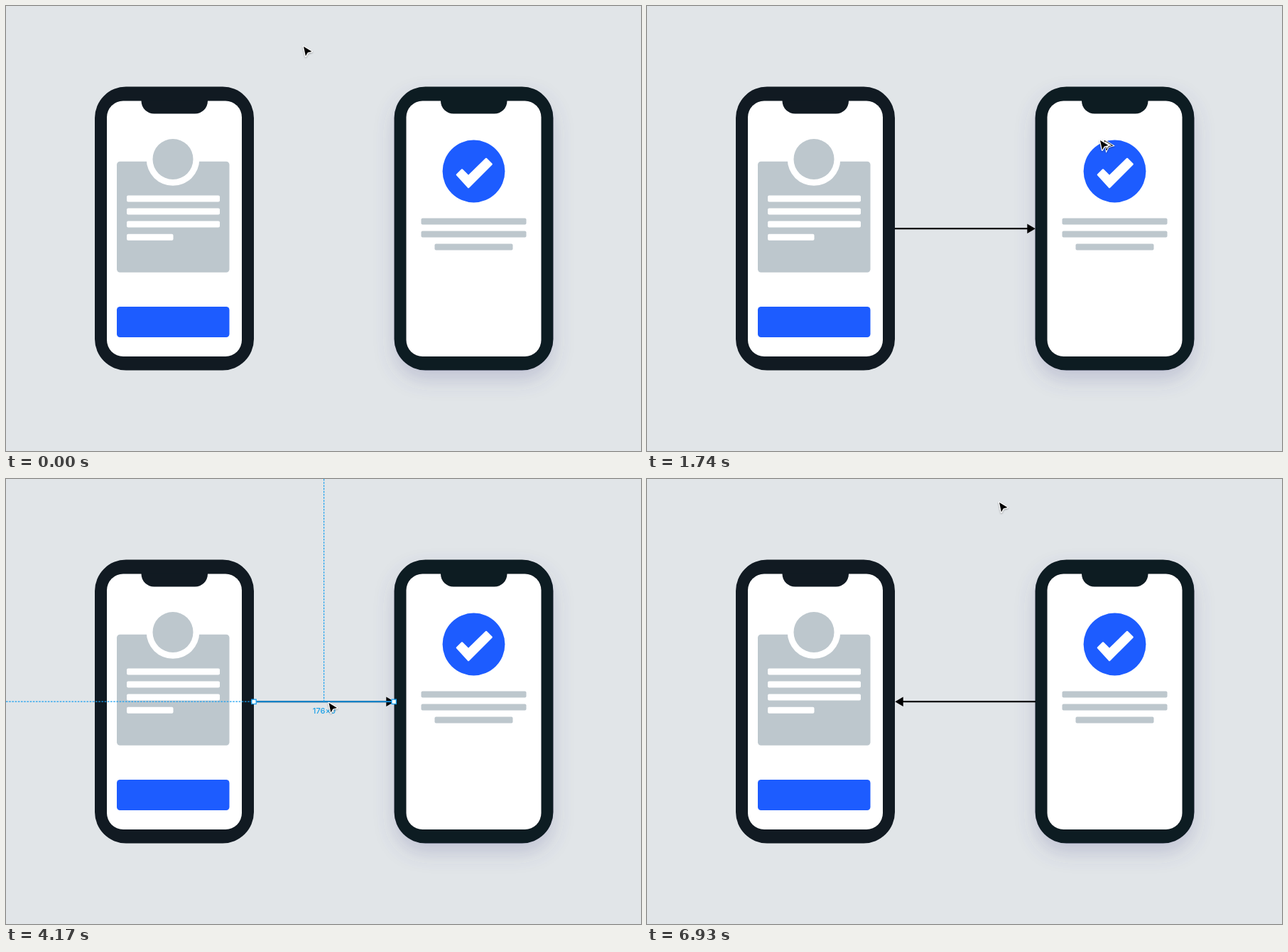
An HTML page that plays this animation: 894x626 px, repeating every 6.96 s.

```html
<!DOCTYPE html>
<html lang="en">
<head>
<meta charset="utf-8">
<title>Connecting two screens</title>
<style>
  html, body { margin: 0; width: 100%; height: 100%; overflow: hidden; background: #e1e5e8; }
  svg { display: block; width: 100vw; height: 100vh; }
  text { font: 500 11px Inter, sans-serif; fill: #18a0e8; text-anchor: middle; letter-spacing: .1px; }
  .outline { fill: none; stroke: #189ff0; stroke-width: 1.3; }
  .hover { fill: none; stroke: #1595f2; stroke-width: 2; }
  .handle { fill: #fff; stroke: #189ff0; stroke-width: 1.3; }
  .guide { fill: none; stroke: #189ff0; stroke-width: 1.2; stroke-dasharray: 2.6 1.6; }
</style>
</head>
<body>
<svg viewBox="0 0 894 626">
  <defs>
    <filter id="phoneShadow" x="-30%" y="-20%" width="160%" height="145%">
      <feDropShadow dx="0" dy="13" stdDeviation="14" flood-color="#50508c" flood-opacity=".22"/>
    </filter>
    <filter id="cursorShadow" x="-50%" y="-50%" width="200%" height="200%">
      <feDropShadow dx="0" dy="1" stdDeviation=".8" flood-color="#000" flood-opacity=".35"/>
    </filter>
    <g id="phone">
      <rect width="224" height="399" rx="44" fill="#111a22"/>
      <rect x="17" y="20" width="190" height="359.5" rx="23" fill="#fff"/>
      <path d="M65.5 19h93.5v1a18 18 0 0 1-18 18h-57.500a18 18 0 0 1-18-18z" fill="#111a22"/>
    </g>
    <path id="pointer" d="M1 1 12.500 8 6.700 9.400 3.900 14.600Z"/>
  </defs>
  <rect width="894" height="626" fill="#e1e5e8"/>

  <use href="#phone" x="125" y="113.5"/>
  <g fill="#bdc7cd">
    <rect x="156" y="218.800" width="158.500" height="156" rx="4.500"/>
    <circle cx="235" cy="215.500" r="37.300" fill="#fff"/>
    <circle cx="235" cy="215.500" r="28.500"/>
  </g>
  <g id="cardLines" fill="#fff"></g>
  <rect x="156" y="423" width="158.500" height="43" rx="4.500" fill="#1d5cff"/>

  <use href="#phone" x="546.5" y="113.5" filter="url(#phoneShadow)"/>
  <circle cx="658.500" cy="232.500" r="43.900" fill="#1d5cff"/>
  <path d="M635 237.500 642 230.500 651 239.500 676 215 683.500 222.500 651 255Z" fill="#fff" stroke="#fff" stroke-width="2.500" stroke-linejoin="round"/>
  <g id="doneLines" fill="#bdc7cd"></g>

  <g id="arrow">
    <path d="M349 313.200H538" stroke="#000" stroke-width="2.300"/>
    <path d="M546.800 313.200 535.300 306.500V319.900Z"/>
  </g>
  <path id="arrowHover" class="hover" d="M349 313.200H546.500" stroke-opacity=".65"/>
  <rect id="leftHover" class="hover" x="124.500" y="113" width="225" height="400.500"/>
  <rect id="rightHover" class="hover" x="546" y="113" width="225" height="400.500"/>

  <g id="leftSelection"></g>
  <g id="bothSelection"></g>
  <g id="arrowSelection"></g>

  <g id="cursor" filter="url(#cursorShadow)">
    <g id="copyPointer" transform="translate(6 .3)">
      <use href="#pointer" stroke="#fff" stroke-width="2.600"/>
      <use href="#pointer" fill="#fff" stroke="#000" stroke-width=".9"/>
    </g>
    <use href="#pointer" stroke="#fff" stroke-width="2.400" stroke-linejoin="round"/>
    <use href="#pointer"/>
  </g>
</svg>
<script>
const LOOP = 6960;
const el = id => document.getElementById(id);
const show = (id, on) => el(id).setAttribute('visibility', on ? 'visible' : 'hidden');
const within = (t, from, to) => t >= from && t < to;

const bar = (x, y, width) => `<rect x="${x}" y="${y}" width="${width}" height="9" rx="2"/>`;
const handle = (x, y) => `<rect class="handle" x="${x - 3.2}" y="${y - 3.2}" width="6.4" height="6.4"/>`;
const box = (x, w) => `<rect class="outline" x="${x}" y="113.300" width="${w}" height="400"/>`;
const corners = (left, right) =>
  [left, right].map(x => handle(x, 113.5) + handle(x, 513)).join('');
const label = (x, y, size) => `<text x="${x}" y="${y}">${size}</text>`;
const guides = (x, top, left) =>
  `<path class="guide" d="M${x} 0V${top}M0 313.200H${left}"/>`;

el('cardLines').innerHTML = [131, 131, 131, 65.5].map((w, i) => bar(170, 266.4 + i * 18.1, w)).join('');
el('doneLines').innerHTML = [148, 148, 110].map((w, i) => bar(658.5 - w / 2, 298.6 + i * 18, w)).join('');

el('leftSelection').innerHTML =
  guides(237, 113, 125) + box(124.8, 224.6) + corners(125, 349) + label(236.7, 529, '200×356');
el('bothSelection').innerHTML =
  box(124.8, 224.6) + box(546.2, 224.6) + box(124.8, 646) + corners(125, 771) + label(448, 529, '576×356');
el('arrowSelection').innerHTML =
  guides(447.6, 313, 349) + '<path class="outline" d="M349 313.200H546.500"/>' +
  handle(349, 313.3) + handle(546.2, 313.3) + label(448, 330, '176×0');

// Cursor moves: start time, end time, destination
const start = [418, 56];
const moves = [
  [30, 360, 262, 172],
  [460, 840, 637, 188],
  [2220, 2470, 452.5, 139],
  [2940, 3520, 453.5, 314],
  [5130, 5460, 453.5, 249.5],
  [5880, 6400, 495, 32]
];
const ease = p => p < .5 ? 4 * p ** 3 : 1 - (2 - 2 * p) ** 3 / 2;

function cursorAt(t) {
  let [x, y] = start;
  for (const [from, to, toX, toY] of moves) {
    if (t <= from) break;
    const p = ease(Math.min(1, (t - from) / (to - from)));
    x += (toX - x) * p;
    y += (toY - y) * p;
  }
  return [x, y];
}

function render(t) {
  const [x, y] = cursorAt(t);
  const leftSelected = within(t, 420, 1080);
  const bothSelected = within(t, 1080, 1560);
  const overPhone = left => within(x, left, left + 224) && within(y, 113, 513);
  const overArrow = within(x, 349, 546) && Math.abs(y - 313) < 5;

  el('cursor').setAttribute('transform', `translate(${x} ${y})`);
  show('copyPointer', within(t, 1440, 1860) || within(t, 4590, 4860));
  show('leftHover', overPhone(125) && !leftSelected && t < 1080);
  show('rightHover', overPhone(546) && !within(t, 1560, 2190));
  show('leftSelection', leftSelected);
  show('bothSelection', bothSelected);
  show('arrow', t >= 1560);
  el('arrow').setAttribute('transform', t < 4740 ? '' : 'translate(896 0) scale(-1 1)');
  show('arrowHover', overArrow);
  show('arrowSelection', within(t, 3810, 5520));
}

function tick() {
  render(performance.now() % LOOP);
  requestAnimationFrame(tick);
}
tick();
</script>
</body>
</html>
```
